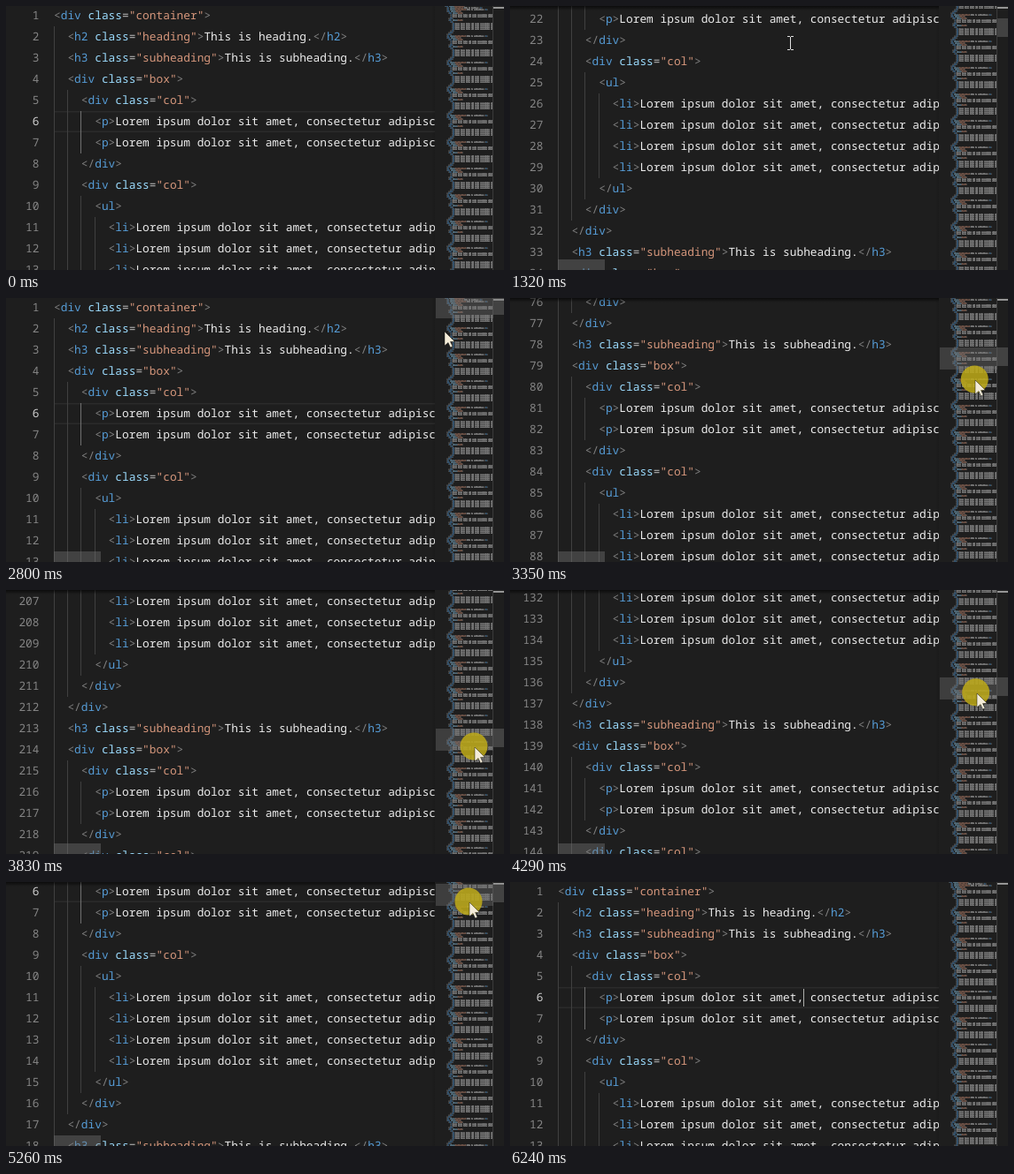
An HTML page with a canvas for the animation above (6.27 s loop, 562 by 299 pixels).

```html
<!DOCTYPE html>
<html lang="en">
<head>
<meta charset="utf-8">
<title>Code editor scrolling</title>
<style>
html, body { margin: 0; width: 100%; height: 100%; overflow: hidden; background: #1e1e1e; }
canvas { display: block; width: 562px; height: 299px; }
</style>
</head>
<body>
<canvas id="stage" width="562" height="299"></canvas>
<script>
const W = 562, H = 299, LOOP = 6270, STEP = 47.5;
const TOP = -1, ROW = 24, CH = 7.7, LEFT = 54, EDGE = 485, LINES = 368;
const MAP_X = 495, MAP_W = 54, SLIDER = 0.0322;
const GRAY = '#808080', BLUE = '#569cd6', ATTR = '#9cdcfe', STR = '#d6977c', TEXT = '#ececec';
const FONT = '12.83px "Noto Sans Mono", "DejaVu Sans Mono", monospace';
const ctx = document.getElementById('stage').getContext('2d');

// ---- document ----
function line(depth, tag, cls, text) {
  const closing = tag[0] === '/', name = tag.replace('/', '');
  const tokens = [[closing ? '</' : '<', GRAY], [name, BLUE]];
  if (cls) tokens.push([' class', ATTR], ['=', '#c0c0c0'], [`"${cls}"`, STR]);
  tokens.push(['>', GRAY]);
  if (text) tokens.push([text, TEXT], ['</', GRAY], [name, BLUE], ['>', GRAY]);
  return { depth, tokens };
}
const lorem = 'Lorem ipsum dolor sit amet, consectetur adipiscing elit, sed do eiusmod.';
const p = line(3, 'p', '', lorem), li = line(4, 'li', '', lorem);
const head = [line(0, 'div', 'container'), line(1, 'h2', 'heading', 'This is heading.')];
const block = [
  line(1, 'h3', 'subheading', 'This is subheading.'),
  line(1, 'div', 'box'),
  line(2, 'div', 'col'), p, p, line(2, '/div'),
  line(2, 'div', 'col'), line(3, 'ul'), li, li, li, li, line(3, '/ul'), line(2, '/div'),
  line(1, '/div')
];
const lineAt = n => n < 3 ? head[n - 1] : block[(n - 3) % block.length];

// ---- minimap, drawn once: each character is 1 x 2 pixels ----
const map = document.createElement('canvas');
map.width = MAP_W;
map.height = LINES * 2;
const mc = map.getContext('2d');
for (let n = 1; n <= LINES; n++) {
  const { depth, tokens } = lineAt(n);
  let col = depth * 2;
  for (const [text, color] of tokens) {
    mc.fillStyle = color;
    for (const c of text) {
      if (c !== ' ') {
        const tall = /[A-Zbdfhiklt"]/.test(c);
        mc.globalAlpha = tall ? 0.4 : 0.25;
        mc.fillRect(col, n * 2 - 2, 1, 1);
        mc.globalAlpha = 0.42;
        mc.fillRect(col, n * 2 - 1, 1, 1);
      }
      col++;
    }
  }
}

// ---- motion: the pointer moves, turns the wheel, then drags the slider ----
const moves = [
  { at: 30, for: 390, x: 316, y: 42, ease: 2 },
  { at: 800, for: 190, scroll: 500 },
  { at: 1320, for: 540, x: 341, y: 143, scroll: 200 },
  { at: 2090, for: 50, scroll: 100 },
  { at: 2320, for: 660, x: 521, y: 18, scroll: 0, ease: 1.5 },
  { at: 3160, for: 670, x: 528, y: 177, scroll: 4942, ease: 1.88, drag: 1.364 },
  { at: 4060, for: 870, x: 522, y: 18, scroll: 0, ease: 1.97, drag: 1.833 },
  { at: 5160, for: 100, y: 22, scroll: 120, drag: 1 },
  { at: 5490, for: 210, y: 18, scroll: 0, drag: 1 },
  { at: 5700, for: 430, x: 580 }
];

function stateAt(t) {
  const state = { x: 470, y: -20, scroll: 0 };
  for (const m of moves) {
    if (t < m.at) break;
    const done = t >= m.at + m.for;
    const u = done ? 1 : Math.min(1, Math.floor((t - m.at) / STEP + 0.1) * STEP / m.for);
    const mix = (key, power = 1) => {
      if (key in m) state[key] = m[key] + (state[key] - m[key]) * (1 - u) ** power;
    };
    mix('x', m.ease);
    mix('y', m.ease);
    mix('scroll', m.drag);
    const notch = m.drag ? 1 : 100;
    state.scroll = Math.round(state.scroll / notch) * notch;
  }
  return state;
}

// ---- drawing ----
function rect(color, x, y, w, h) {
  ctx.fillStyle = color;
  ctx.fillRect(x, y, w, h);
}

function fade(x0, y0, x1, y1, from, to) {
  const g = ctx.createLinearGradient(x0, y0, x1, y1);
  g.addColorStop(0, `rgba(0,0,0,${from})`);
  g.addColorStop(1, `rgba(0,0,0,${to})`);
  return g;
}

function drawRow(n, y) {
  const { depth, tokens } = lineAt(n), active = n === 6;
  if (active) {
    rect('#2b2b2b', LEFT, y, EDGE - LEFT, 1.5);
    rect('#2b2b2b', LEFT, y + ROW - 1.5, EDGE - LEFT, 1.5);
  }
  for (let k = 0; k < depth; k++) {
    const lit = k === 2 && (n === 6 || n === 7);
    rect(lit ? '#707070' : '#404040', Math.floor(LEFT + k * 2 * CH), y, 1, ROW);
  }
  ctx.fillStyle = active ? '#d0d0d0' : '#858585';
  ctx.textAlign = 'right';
  ctx.fillText(n, 37.5, y + 16);
  ctx.textAlign = 'left';
  let x = LEFT + depth * 2 * CH;
  for (const [text, color] of tokens) {
    ctx.fillStyle = color;
    ctx.fillText(text, x, y + 16);
    x += text.length * CH;
  }
}

function drawText(scroll, caret) {
  ctx.save();
  ctx.beginPath();
  ctx.rect(0, 0, EDGE - 1, H);
  ctx.clip();
  ctx.font = FONT;
  ctx.textRendering = 'geometricPrecision';
  const first = Math.floor(scroll / ROW) + 1;
  for (let n = first; n < first + 14; n++) drawRow(n, TOP + (n - 1) * ROW - scroll);
  if (caret) rect('#aeafad', 331, TOP + 5 * ROW - scroll + 2, 1, 20);
  if (scroll > 0) rect(fade(0, 0, 0, 5, 0.6, 0), 0, 0, EDGE, 5);
  rect(fade(EDGE - 5, 0, EDGE, 0, 0, 0.12), EDGE - 5, 0, 5, H);
  ctx.restore();
}

function drawMap(scroll, bars, onMap) {
  const start = Math.floor(scroll / ROW - scroll * SLIDER / 2);
  const top = Math.floor(scroll * SLIDER - 1.5);
  ctx.drawImage(map, MAP_X, TOP - start * 2);
  if (onMap) rect('rgba(121,121,121,.36)', EDGE, top, 65, 25);
  rect('rgba(127,127,127,.3)', 549, 0, 1, H);
  rect('#969696', 550, 1, 12, 2);
  ctx.globalAlpha = bars;
  rect('rgba(121,121,121,.4)', 550, top, 12, 21);
  rect('rgba(121,121,121,.4)', LEFT, 287, 53, 12);
  ctx.globalAlpha = 1;
}

function drawMouse(x, y, pressed) {
  if (pressed) {
    ctx.fillStyle = 'rgba(190,170,24,.85)';
    ctx.beginPath();
    ctx.arc(x, y, 15.5, 0, 7);
    ctx.fill();
  }
  ctx.save();
  ctx.translate(Math.round(x), Math.round(y));
  if (x < EDGE) {
    rect('#e0e0e0', 0, -7, 1, 14);
    for (const end of [-8, 7]) {
      rect('#e0e0e0', -3, end, 3, 1);
      rect('#e0e0e0', 1, end, 3, 1);
    }
  } else {
    const arrow = new Path2D('M1 1V17L5 13.5L7.5 19L10 18L7.5 12.5H12.5Z');
    ctx.fillStyle = '#f4ecd8';
    ctx.fill(arrow);
    ctx.strokeStyle = 'rgba(0,0,0,.6)';
    ctx.lineWidth = 0.7;
    ctx.stroke(arrow);
  }
  ctx.restore();
}

function draw(t) {
  const { x, y, scroll } = stateAt(t);
  const bars = Math.max(0, Math.min(1, (t - 30) / 390, (6240 - t) / 540));
  rect('#1e1e1e', 0, 0, W, H);
  drawText(scroll, t >= 6230);
  drawMap(scroll, bars, x > EDGE && x < W);
  drawMouse(x, y, t >= 2980 && t < 5700);
}

const began = performance.now();
function frame() {
  draw((performance.now() - began) % LOOP);
  requestAnimationFrame(frame);
}
frame();
</script>
</body>
</html>
```
